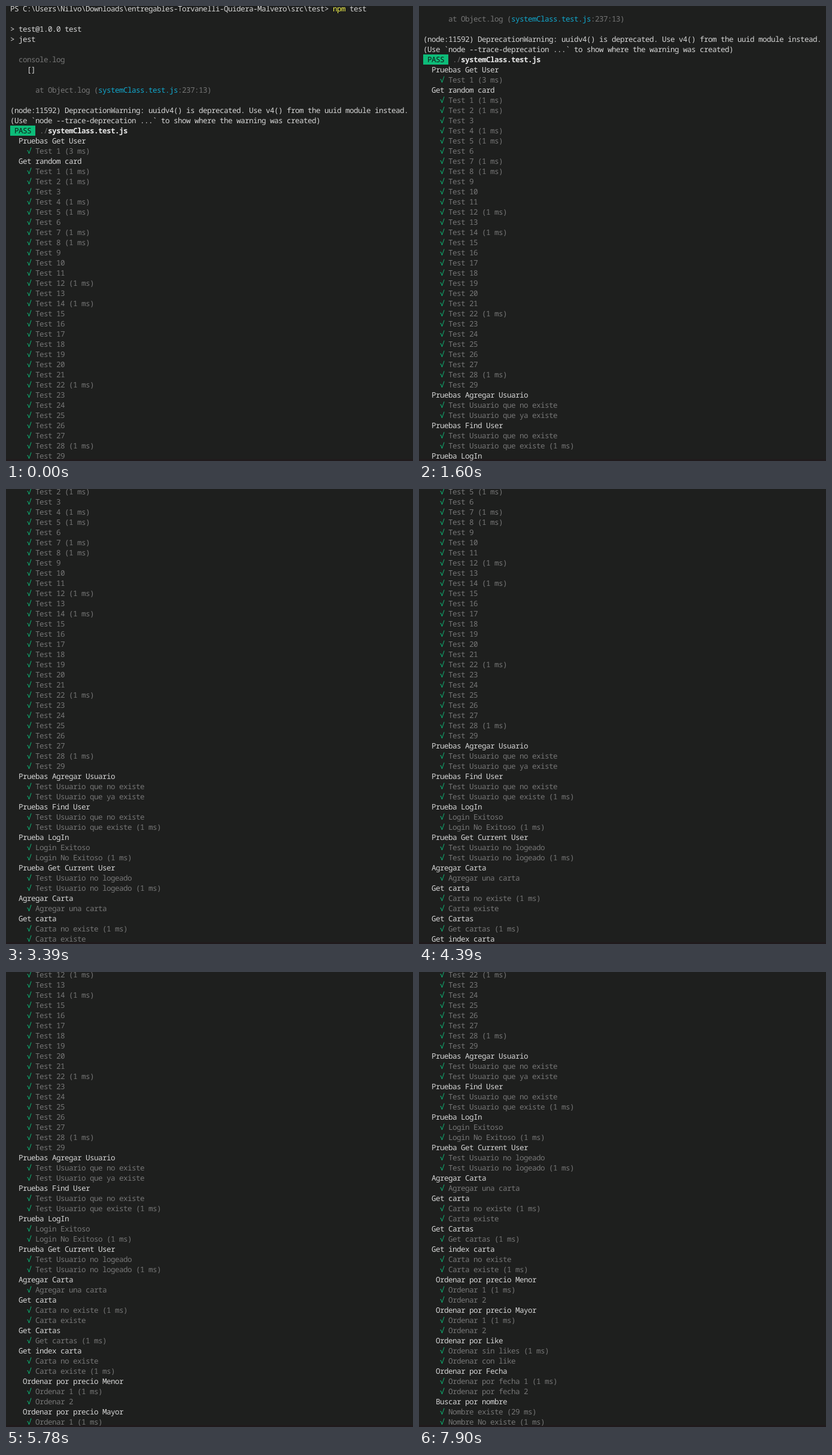
An HTML page that plays this animation: 680x761 px, repeating every 8 s.

```html
<!DOCTYPE html>
<html lang="es">
<head>
<meta charset="utf-8">
<title>Terminal</title>
<style>
  html, body { margin: 0; width: 100%; height: 100%; overflow: hidden; background: #1e1f1e; }
  svg { display: block; width: 680px; height: 761px; }
  text { font: 12.6px "Noto Sans Mono", "DejaVu Sans Mono", monospace; white-space: pre; text-rendering: geometricPrecision; }
  .fg { fill: #d6d6d6; }
  .dim { fill: #767676; }
  .ok { fill: #0dbc79; }
  .cmd { fill: #f0f04a; }
  .link { fill: #11a8cd; }
  .bold { fill: #e8e8e8; font-weight: 700; }
  .badge { fill: #101a16; }
</style>
</head>
<body>
<svg viewBox="0 0 680 761">
  <rect width="680" height="761" fill="#1e1f1e"/>
  <rect y="758" width="680" height="3" fill="#201a1c"/>
  <g id="log"></g>
</svg>
<script>
const NS = 'http://www.w3.org/2000/svg';
const CELL = 7, ROW = 17, LEFT = 7, BASE = 9, LOOP = 8000;
const log = document.getElementById('log');
let row = 0;

function add(tag, attrs, content = '') {
  const el = document.createElementNS(NS, tag);
  for (const k in attrs) el.setAttribute(k, attrs[k]);
  el.textContent = content;
  log.appendChild(el);
}

// Puts one run of text on the terminal's character grid
function put(col, cls, str) {
  const x = [...str].map((_, i) => LEFT + (col + i) * CELL).join(' ');
  add('text', { x, y: BASE + row * ROW, class: cls }, str);
}

// One row: a start column, then [class, text] runs side by side
function line(col = 0, ...runs) {
  for (const [cls, str] of runs) {
    put(col, cls, str);
    col += str.length;
  }
  row++;
}

const head = (str, col = 2) => line(col, ['fg', str]);
const pass = str => line(4, ['ok', '√'], ['dim', ' ' + str]);

function group(title, tests, col) {
  head(title, col);
  tests.forEach(pass);
}

line(0, ['fg', 'PS C:\\Users\\Nilvo\\Downloads\\entregables-Torvanelli-Quidera-Malvero\\src\\test> '],
  ['cmd', 'npm'], ['fg', ' test']);
line();
head('> test@1.0.0 test', 0);
head('> jest', 0);
line();
line(2, ['dim', 'console.log']);
head('[]', 4);
line();
line(6, ['dim', 'at Object.log ('], ['link', 'systemClass.test.js'], ['dim', ':237:13)']);
line();
head('(node:11592) DeprecationWarning: uuidv4() is deprecated. Use v4() from the uuid module instead.', 0);
head('(Use `node --trace-deprecation ...` to show where the warning was created)', 0);
add('rect', { x: LEFT, y: row * ROW - 4, width: 6 * CELL, height: ROW, fill: '#0dbc79' });
line(1, ['badge', 'PASS'], ['dim', '  ./'], ['bold', 'systemClass.test.js']);

const timed = [1, 2, 4, 5, 7, 8, 12, 14, 22, 28];
const cards = Array.from({ length: 29 }, (_, i) =>
  `Test ${i + 1}` + (timed.includes(i + 1) ? ' (1 ms)' : ''));
const sorts = ['Ordenar 1 (1 ms)', 'Ordenar 2'];

group('Pruebas Get User', ['Test 1 (3 ms)']);
group('Get random card', cards);
group('Pruebas Agregar Usuario', ['Test Usuario que no existe', 'Test Usuario que ya existe']);
group('Pruebas Find User', ['Test Usuario que no existe', 'Test Usuario que existe (1 ms)']);
group('Prueba LogIn', ['Login Exitoso', 'Login No Exitoso (1 ms)']);
group('Prueba Get Current User', ['Test Usuario no logeado', 'Test Usuario no logeado (1 ms)']);
group('Agregar Carta', ['Agregar una carta']);
group('Get carta', ['Carta no existe (1 ms)', 'Carta existe']);
group('Get Cartas', ['Get cartas (1 ms)']);
group('Get index carta', ['Carta no existe', 'Carta existe (1 ms)']);
group('Ordenar por precio Menor', sorts, 3);
group('Ordenar por precio Mayor', sorts, 3);
group('Ordenar por Like', ['Ordenar sin likes (1 ms)', 'Ordenar con like'], 3);
group('Ordenar por Fecha', ['Ordenar por fecha 1 (1 ms)', 'Ordenar por fecha 2'], 3);
group('Buscar por nombre', ['Nombre existe (29 ms)', 'Nombre No existe (1 ms)'], 3);

// Each moment scrolls the log up by one row
const steps = [
  330, 600, 800, 1000, 1200, 1470, 1600, 1800, 1930, 2130, 2260, 2390, 2520,
  2790, 3060, 3260, 3390, 3660, 3990, 4390, 4520, 4720, 4850, 5050, 5180,
  5510, 5780, 5980, 6170, 6440, 6710, 7040, 7240, 7370, 7570, 7700, 7900
];

function draw(t) {
  const rows = steps.filter(s => s <= t).length;
  log.setAttribute('transform', `translate(0 ${-rows * ROW})`);
}

const start = performance.now();
function tick() {
  draw((performance.now() - start) % LOOP);
  requestAnimationFrame(tick);
}
draw(0);
requestAnimationFrame(tick);
</script>
</body>
</html>
```
